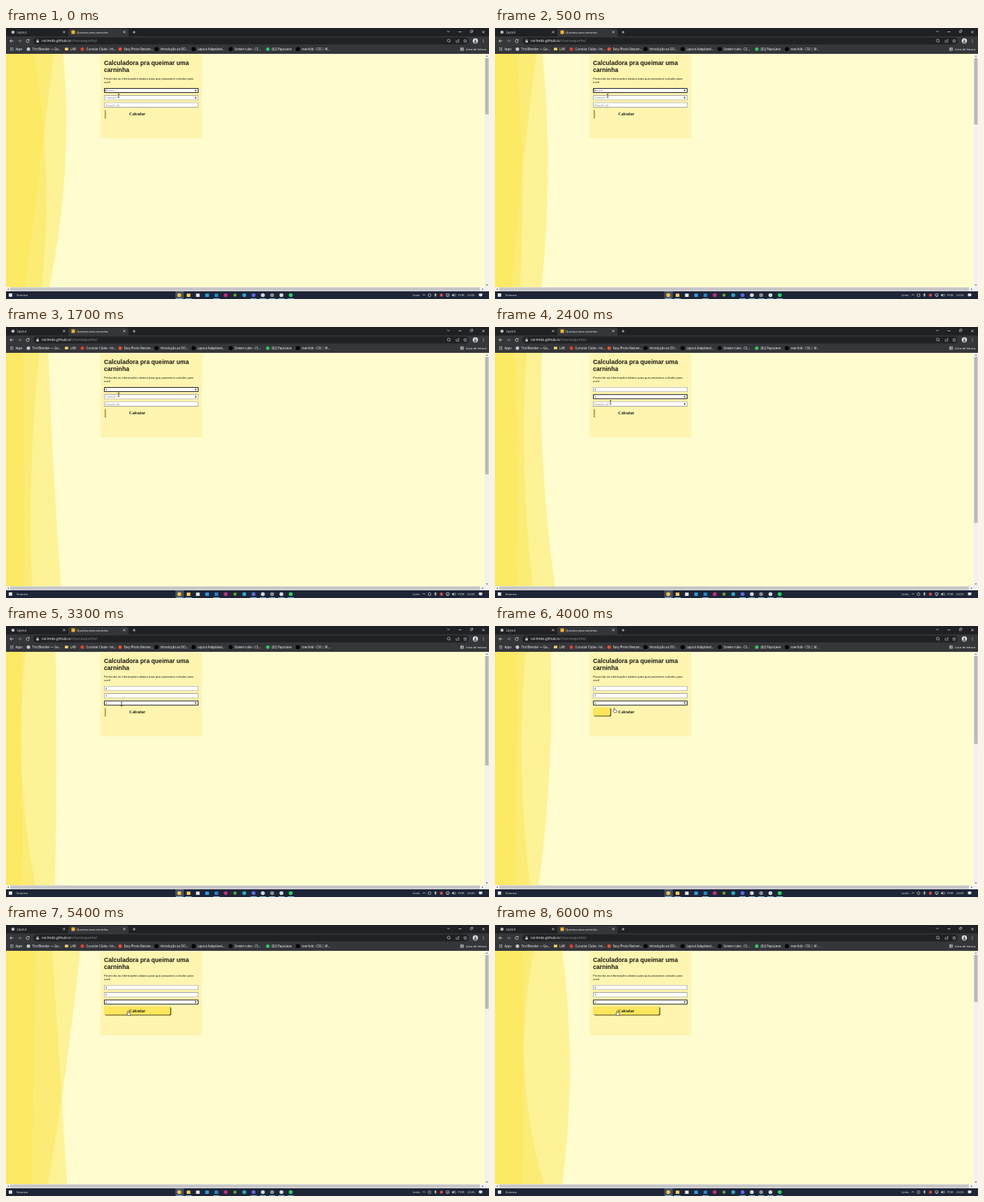
Recreate the animation shown at these times as an HTML page with a canvas. Size 690 px wide and 388 px high, loop 6.1 s.

```html
<!DOCTYPE html>
<html lang="pt-BR">
<head>
<meta charset="utf-8">
<title>Queima uma carninha</title>
<style>
  html, body { margin: 0; width: 100%; height: 100%; overflow: hidden; background: #fffdd0; }
  canvas { display: block; }
</style>
</head>
<body>
<canvas width="690" height="388"></canvas>
<script>
const ctx = document.querySelector('canvas').getContext('2d');
const LOOP = 6100, STEP = 100;
const UI = '"Open Sans", "Noto Sans", sans-serif';
const ARIAL = '"Liberation Sans", Arial, sans-serif';
const TIMES = '"Liberation Serif", "Times New Roman", serif';

// Wave edges: time, then x at the top, middle and bottom of the page
const WAVES = [
  [[0, 82, 84, 62], [1000, 54, 67, 71], [2400, 67, 69, 86], [3300, 71, 72, 70],
   [4600, 87, 83, 56], [5400, 106, 86, 60], [6000, 96, 107, 96]],
  [[0, 68, 48, 27], [1000, 50, 31, 20], [2400, 45, 42, 54], [3300, 28, 22, 42],
   [4600, 57, 52, 57], [5400, 66, 77, 87], [6000, 56, 42, 70]],
  [[0, 40, 57, 51], [1000, 20, 20, 21], [2400, 28, 32, 31], [3300, 22, 22, 23],
   [4600, 40, 38, 35], [5400, 42, 40, 37], [6000, 40, 40, 39]]
];
// Page height in viewports
const PAGE = [[0, 4], [1000, 2.8], [2150, 1.36], [2850, 1.36], [3300, 2.06], [4600, 3], [5400, 4.2], [6000, 4.8]];
const POINTER = [[0, 161, 97], [1700, 161, 97], [2200, 165, 108], [2800, 165, 108],
  [3200, 165, 112], [3700, 165, 112], [4200, 175, 126]];
const FIELDS = [
  { hint: 'Adultos', value: '4', typed: 1300 },
  { hint: 'Crianças', value: '1', typed: 2200 },
  { hint: 'Duração (h)', value: '2', typed: 3200 }
];

function sample(keys, t) {
  const i = keys.findIndex(k => k[0] > t);
  if (i < 0) return keys.at(-1).slice(1);
  const a = keys[i - 1], b = keys[i], p = (t - a[0]) / (b[0] - a[0]);
  return a.slice(1).map((v, n) => v + (b[n + 1] - v) * p);
}

function rect(x, y, w, h, color, r = 0) {
  ctx.fillStyle = color;
  ctx.beginPath();
  ctx.roundRect(x, y, w, h, r);
  ctx.fill();
}

function dot(x, y, r, color) {
  rect(x - r, y - r, 2 * r, 2 * r, color, r);
}

function text(str, x, y, size, color, family = UI, weight = 400, align = 'left') {
  ctx.font = `${weight} ${size}px ${family}`;
  ctx.fillStyle = color;
  ctx.textAlign = align;
  ctx.fillText(str, x, y);
  return ctx.measureText(str).width;
}

function stroke(d, x, y, color = '#d5d6d8', width = 0.8) {
  ctx.save();
  ctx.translate(x, y);
  ctx.strokeStyle = color;
  ctx.lineWidth = width;
  ctx.stroke(new Path2D(d));
  ctx.restore();
}

function fill(d, x, y, color) {
  ctx.save();
  ctx.translate(x, y);
  ctx.fillStyle = color;
  ctx.fill(new Path2D(d));
  ctx.restore();
}

const CROSS = 'M-1.6-1.6L1.6 1.6M1.6-1.6L-1.6 1.6';
const RING = 'M2 0A2 2 0 1 1-2 0A2 2 0 1 1 2 0';

function drawBrowser() {
  rect(0, 0, 690, 37, '#35363a');
  rect(0, 0, 690, 12, '#202124');
  rect(89, 1, 86, 12, '#35363a', [3, 3, 0, 0]);
  dot(10, 6, 2.3, '#b9bcc0');
  text('Layout', 15.5, 7.8, 4.4, '#d3d5d8');
  rect(93.5, 3.5, 5, 5, '#f0b429');
  text('Queima uma carninha', 101, 7.8, 4.3, '#ffffff');
  for (const x of [83, 169, 682]) stroke(CROSS, x, 5.8);
  stroke('M-2 0H2M0-2V2', 183, 6);
  stroke('M-1.6-.8L0 .8L1.6-.8', 632, 5);
  stroke('M-2 0H2', 648.5, 5.5);
  stroke('M-1.6-1H1V1.6H-1.6ZM-.6-1.9H1.9V.7', 665, 5, '#d5d6d8', 0.6);

  stroke('M2.5 0H-2.3M0-2.3L-2.3 0L0 2.3', 8, 18.5);
  stroke('M-2.5 0H2.3M0-2.3L2.3 0L0 2.3', 19.5, 18.5, '#85868a');
  stroke('M1.8-1.2A2.2 2.2 0 1 0 2.2.6M2.2-2.4V-.8H.4', 31, 18.5);
  rect(39, 13.5, 622, 10, '#202124', 5);
  rect(43.5, 18, 3.4, 2.8, '#c8cacc', 0.4);
  stroke('M-1 0V-1A1 1 0 0 1 1-1V0', 45.2, 18, '#c8cacc', 0.6);
  const host = text('rai-lmdo.github.io', 51, 20.3, 5, '#ffffff');
  text('/churrasquinho/', 51 + host, 20.3, 5, '#8d9094');
  stroke(RING + 'M1.4 1.4L2.6 2.6', 632.5, 18, '#c8cacc', 0.7);
  stroke('M-2-1V2H2V0M-.5.7Q0-1.4 2-1.4M1-2.4L2.2-1.4L1-.4', 645, 18.3, '#c8cacc', 0.6);
  stroke('M0-2.4L.7-.7L2.4-.6L1.1.5L1.5 2.2L0 1.3L-1.5 2.2L-1.1.5L-2.4-.6L-.7-.7Z', 656, 18.5, '#c8cacc', 0.6);
  dot(670.5, 18.5, 3.7, '#e6e6e6');
  dot(670.5, 17.6, 1.2, '#4b4d52');
  rect(668.4, 19.2, 4.2, 2, '#4b4d52', 1);
  for (let i = -1; i < 2; i++) dot(682, 18.5 + i * 1.7, 0.55, '#d5d6d8');

  for (let i = 0; i < 9; i++) rect(6 + i % 3 * 1.7, 28 + (i / 3 | 0) * 1.7, 1.1, 1.1, '#c4c6c9');
  const marks = [
    [8, '', 'Apps'], [32, '#c4c6c9', 'Tint Blender — Ge...'], [86.5, '#f6cf62', 'LAB'],
    [109, '#e0402f', 'Cursolar Clube - Int...'], [163, '#e5532d', 'Easy Photo Resizer...'],
    [215, '#050505', 'Introdução ao DO...'], [268, '#050505', 'Layout Adaptável...'],
    [321, '#050505', 'Screen rules - CS...'], [374, '#2fcb5c', '(82) PapoLeve'],
    [417, '#050505', 'row-fold - CSS | M...']
  ];
  for (const [x, color, label] of marks) {
    if (label === 'LAB') rect(x - 2.4, 28.2, 4.8, 3.9, color, 0.5);
    else if (color) dot(x, 30.2, color === '#050505' ? 3 : 2.5, color);
    text(label, x + 5.4, 31.8, 4.4, '#ffffff');
  }
  stroke('M-2-2H2V2H-2ZM-2-.6H2M-2 .8H2M-.6-2V2', 651.5, 30.2, '#d5d6d8', 0.6);
  text('Lista de leitura', 657, 31.8, 4.3, '#ffffff');
}

function drawTaskbar() {
  rect(0, 377, 690, 11, '#1d2536');
  rect(4, 380, 4.8, 4.8, '#e8eaee');
  text('Sistema', 15, 384.2, 4.3, '#f2f3f5');
  rect(242, 377, 12, 11, '#4a515f');
  const apps = ['#e8c14b', '#f7ce5b', '#e3e5e8', '#2e9be6', '#2385d0', '#c32a82', '#6fa52d',
    '#2aa6c4', '#5a68e8', '#cfd8e3', '#8c8f96', '#cfd8e3', '#28cf63'];
  apps.forEach((color, i) => {
    const x = 247.5 + i * 13.27;
    if ([1, 2, 3, 4].includes(i)) rect(x - 2.6, 380.2, 5.2, 4.8, color, 0.5);
    else dot(x, 382.5, i === 6 ? 2.2 : 2.8, color);
    if ([0, 1, 4, 8, 9, 10, 11, 12].includes(i)) rect(x - 4.5, 387, 9, 1, '#79b4df');
  });
  text('Links', 581, 384.2, 4.3, '#f2f3f5');
  stroke('M-1.7.8L0-.9L1.7.8', 597, 382.3);
  stroke(RING, 605, 382.5, '#d5d6d8', 0.7);
  rect(612.5, 380, 2, 3.6, '#d5d6d8', 1);
  stroke('M-1.6 0Q0 2 1.6 0M0 1V2.2', 613.5, 383, '#d5d6d8', 0.5);
  dot(622, 382.5, 2.2, '#d94a48');
  stroke('M-2-1.5H2V1.4H-2ZM-1 2.2H1', 631, 382.2, '#d5d6d8', 0.7);
  fill('M-2.5-.8H-1.3L.3-2.2V2.2L-1.3.8H-2.5Z', 639.5, 382.5, '#d5d6d8');
  stroke('M0-1.4Q1.4 0 0 1.4M1.2-2.2Q3.2 0 1.2 2.2', 640.5, 382.5, '#d5d6d8', 0.5);
  text('POR', 646, 384.2, 4.3, '#f2f3f5');
  text('23:55', 659, 384.2, 4.2, '#f2f3f5');
  fill('M-2.4-2H2.4V1.5H.8L-.6 2.8V1.5H-2.4Z', 678, 382.3, '#e4e6e9');
}

function drawScrollbars(t) {
  const TRACK = '#f1f1f1', THUMB = '#b9b9b9', ARROW = '#555555';
  rect(684, 37, 6, 340, TRACK);
  rect(0, 371, 690, 6, TRACK);
  rect(684.5, 43, 5, 323 / sample(PAGE, t)[0], THUMB);
  rect(6, 371.6, 671, 4.8, '#c6c6c6');
  fill('M-1.5.8L0-.9L1.5.8Z', 687, 40.3, ARROW);
  fill('M-1.5-.8L0 .9L1.5-.8Z', 687, 368, ARROW);
  fill('M.8-1.5L-.9 0L.8 1.5Z', 3, 374, ARROW);
  fill('M-.8-1.5L.9 0L-.8 1.5Z', 681, 374, ARROW);
}

function drawWaves(t) {
  ctx.fillStyle = 'rgba(251,229,78,.45)';
  for (const keys of WAVES) {
    const [top, mid, bottom] = sample(keys, t);
    ctx.beginPath();
    ctx.moveTo(0, 37);
    ctx.lineTo(top, 37);
    ctx.quadraticCurveTo(2 * mid - (top + bottom) / 2, 204, bottom, 371);
    ctx.lineTo(0, 371);
    ctx.fill();
  }
}

function drawField({ hint, value, typed }, i, t, focused, hovered) {
  const y = 86 + i * 10.35, filled = t >= typed;
  rect(140, y, 135, 7, focused ? '#1c1c20' : '#85858a', 1);
  const b = focused ? 1 : 0.6;
  rect(140 + b, y + b, 135 - 2 * b, 7 - 2 * b, '#ffffff', 0.5);
  text(filled ? value : hint, 142, y + 4.9, 3.8, filled ? '#222222' : '#85858a', ARIAL);
  if (focused && !filled) rect(141.7, y + 1.5, 0.5, 4, '#222222');
  if (focused || hovered) fill('M-1.3-.3L0-1.8L1.3-.3ZM-1.3.3L0 1.8L1.3.3Z', 271, y + 3.5, '#333333');
}

function drawButton(t) {
  const grow = Math.min(1, Math.max(0, (t - 3900) / 400));
  const w = 1.6 + 93.4 * grow, r = Math.min(2, w / 2);
  rect(141, 117.3, w, 12.2, grow ? '#4c4016' : '#8d7430', r);
  rect(140, 116.4, w - 0.2, 12, grow ? '#fbe65c' : '#fae88a', r);
  text('Calcular', 187.5, 124.5, 6.2, '#151515', TIMES, 700, 'center');
}

function drawPointer(t) {
  const [x, y] = sample(POINTER, t);
  if (y > 116) {
    const hand = 'M-1.2-2.6Q-.6-3.4 0-2.6V-.6L2.4 0Q3 .2 2.8 1.4L2.2 3.6H-.8L-2.6 1Q-2.2.2-1.2.9Z';
    fill(hand, x, y, '#ffffff');
    stroke(hand, x, y, '#222222', 0.6);
  } else {
    stroke('M-1.2-2.6H1.2M0-2.6V2.6M-1.2 2.6H1.2', x, y, '#222222', 0.7);
  }
}

function drawPage(t) {
  rect(0, 37, 690, 340, '#fffdd0');
  drawWaves(t);
  rect(135, 38, 145.3, 120, '#fff5b0', 1);
  text('Calculadora pra queimar uma', 140, 53.3, 8.65, '#15150f', ARIAL, 700);
  text('carninha', 140, 63.3, 8.65, '#15150f', ARIAL, 700);
  text('Preencha as informações abaixo para que possamos calcular para', 140, 74.3, 4.32, '#15150f', ARIAL);
  text('você', 140, 79.3, 4.32, '#15150f', ARIAL);
  const focus = t < 1800 ? 0 : t < 2800 ? 1 : 2;
  const hover = t < 2100 ? 1 : 2;
  FIELDS.forEach((field, i) => drawField(field, i, t, i === focus, i === hover && t < 3800));
  drawButton(t);
  drawPointer(t);
}

function frame(now) {
  const t = Math.floor(now % LOOP / STEP) * STEP;
  drawPage(t);
  drawScrollbars(t);
  drawBrowser();
  drawTaskbar();
  requestAnimationFrame(frame);
}
requestAnimationFrame(frame);
</script>
</body>
</html>
```
